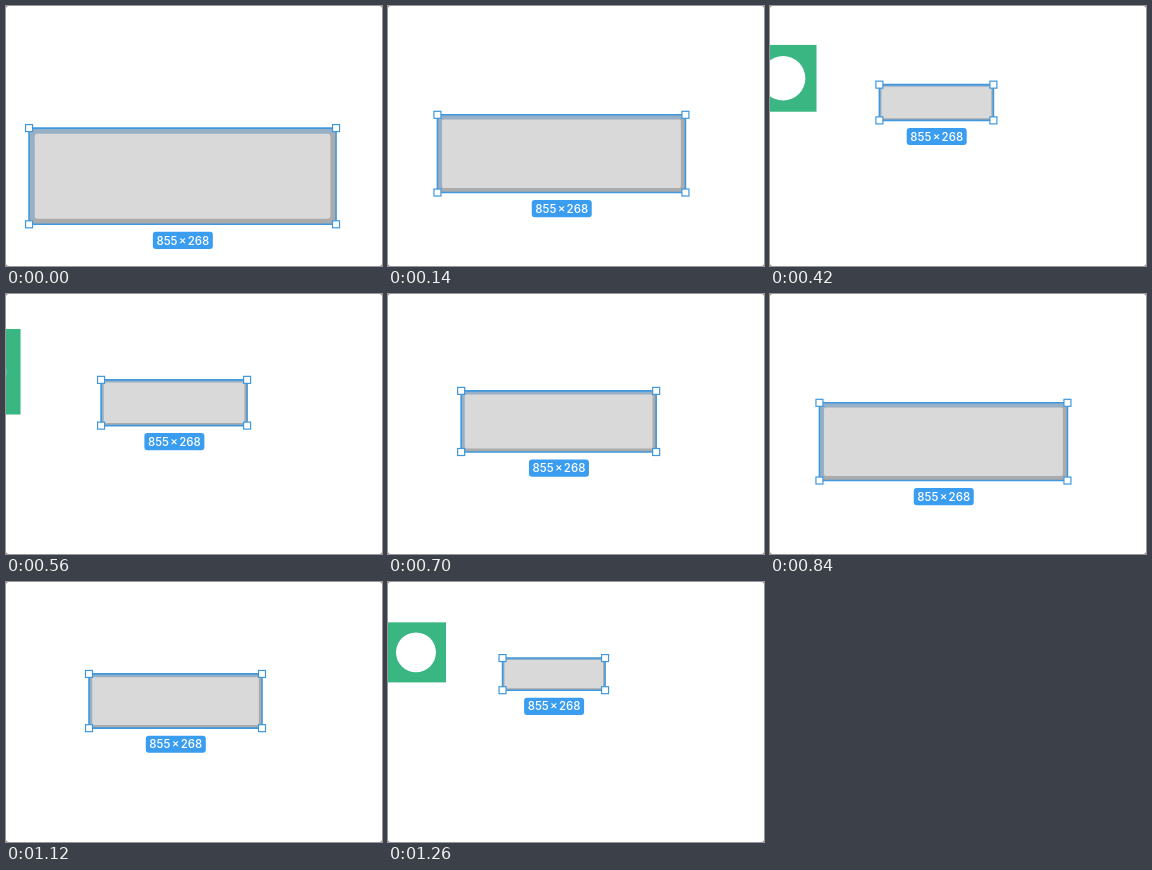
An HTML page for the animation above (1330 ms loop, 376 by 260 pixels).

```html
<!DOCTYPE html>
<html lang="en">
<head>
<meta charset="utf-8">
<title>Canvas zoom</title>
<style>
  html, body { margin: 0; width: 100%; height: 100%; overflow: hidden; background: #555; }
  svg { display: block; }
  .outline { fill: none; stroke: #3f98dd; stroke-width: 1.6; vector-effect: non-scaling-stroke; }
  .handle { fill: #fff; stroke: #3f98dd; stroke-width: 1.2; }
  text { font: 500 11.5px Inter, sans-serif; word-spacing: -1.8px; fill: #fff; text-anchor: middle; }
</style>
</head>
<body>
<svg width="376" height="260" viewBox="0 0 376 260">
  <rect width="376" height="260" rx="2" fill="#fff"/>
  <!-- One unit is the width of the selected box; the origin is the zoom centre. -->
  <g id="world">
    <rect x="-1.585" y="-.1235" width=".586" height=".586" fill="#3ab683"/>
    <circle cx="-1.292" cy=".1695" r=".195" fill="#fff"/>
    <g transform="translate(-.4474 .225)">
      <rect width="1" height=".3135" fill="#ababab"/>
      <path d="M0 0H1L.98 .02H.02V.2935L0 .3135Z" fill="#98b0c6"/>
      <rect x=".0185" y=".0185" width=".963" height=".2765" rx=".008" fill="#d9d9d9"/>
      <rect class="outline" width="1" height=".3135"/>
    </g>
  </g>
  <g id="handles"></g>
  <g id="label">
    <rect x="-30" y="7.5" width="60" height="17.2" rx="3" fill="#3b9df0"/>
    <text y="20.3">855 × 268</text>
  </g>
</svg>
<script>
  const STEP = 70;
  const CENTER = { x: 160.4, y: 53 };
  const BOX = { left: -.4474, right: .5526, top: .225, bottom: .5385 };
  // Box width in pixels after each wheel tick
  const WIDTHS = [307, 289, 248, 203, 162, 130, 114, 126, 146, 169,
                  195, 222, 248, 267, 275.5, 233, 173, 118, 102.5];

  const byId = id => document.getElementById(id);
  const world = byId('world'), label = byId('label'), handles = byId('handles');
  const corners = [['left', 'top'], ['right', 'top'], ['left', 'bottom'], ['right', 'bottom']];

  handles.innerHTML = corners.map(() =>
    '<rect class="handle" x="-3.5" y="-3.5" width="7" height="7"/>').join('');

  function moveTo(node, x, y, extra = '') {
    node.setAttribute('transform', `translate(${x} ${y}) ${extra}`);
  }

  function draw(now) {
    const w = WIDTHS[Math.floor(now / STEP) % WIDTHS.length];
    const px = u => CENTER.x + u * w;
    const py = v => CENTER.y + v * w;
    moveTo(world, CENTER.x, CENTER.y, `scale(${w})`);
    corners.forEach(([h, v], i) => moveTo(handles.children[i], px(BOX[h]), py(BOX[v])));
    moveTo(label, px((BOX.left + BOX.right) / 2) + .3, py(BOX.bottom));
  }

  const start = performance.now();
  function tick() {
    draw(performance.now() - start);
    requestAnimationFrame(tick);
  }
  tick();
</script>
</body>
</html>
```
